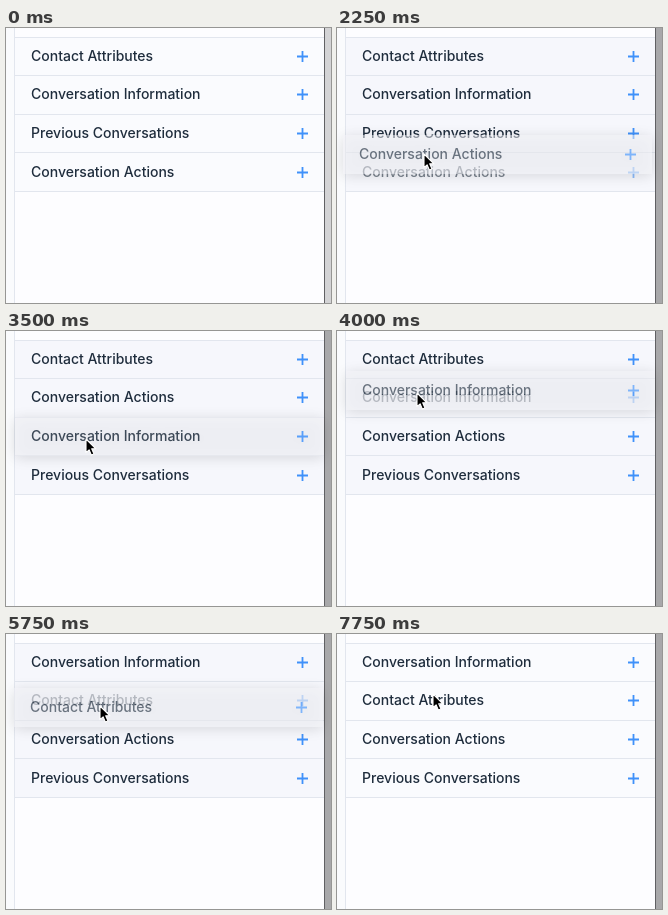
Recreate the animation shown at these times as an HTML page. Size 325 px wide and 275 px high, loop 8000 ms.

```html
<!DOCTYPE html>
<html lang="en">
<head>
<meta charset="utf-8">
<title>Reorder panel sections</title>
<style>
  html, body { margin: 0; width: 100%; height: 100%; overflow: hidden; background: #fdfdff; }
  body > *, .row svg { position: absolute; }
  .row {
    left: 9px; top: 0; width: 293px; height: 39px; padding-left: 16px;
    font: 500 14px/37px Inter, "Open Sans", sans-serif; color: #1f2d3d; white-space: nowrap;
  }
  .row svg { left: 282px; top: 14px; width: 11px; height: 11px; fill: none; stroke: #3f91fa; stroke-width: 1.8; }
  #side { left: 0; top: 0; width: 8px; height: 100%; background: #fafbfd; border-right: 1px solid #e2e6ee; }
  #list { left: 9px; top: 9px; width: 309px; height: 154px; }
  .line { left: 9px; width: 309px; height: 1px; background: #e2e6ee; }
  #edge { left: 318px; top: 0; width: 6px; height: 100%; border-left: 1px solid #606063; }
  #ghost {
    background: rgba(241, 241, 246, .8); opacity: .65;
    filter: drop-shadow(0 2px 7px rgba(0, 0, 0, .24));
  }
  #cursor {
    left: 0; top: 0; width: 12px; height: 18px; overflow: visible;
    stroke: #fff; stroke-width: 1.1; stroke-linejoin: round;
  }
</style>
</head>
<body>
<div id="side"></div>
<div id="list"></div>
<div id="edge"></div>
<div id="ghost" class="row"></div>
<svg id="cursor"><path d="M0 0V13.6L3.1 10.8L5.3 16L7.9 14.9L5.7 9.8H9.9Z"/></svg>
<script>
  const STEP = 250, COUNT = 32, TOP = 9, PITCH = 38.5;
  const $ = id => document.getElementById(id);
  const labels = ['Contact Attributes', 'Conversation Information',
    'Previous Conversations', 'Conversation Actions'];

  // Pointer waypoints: step, x, y
  const path = [
    [1, 300, 258], [5, 74, 142], [6, 74, 142], [8, 90, 144], [11, 79, 76],
    [14, 80, 108], [16, 80, 62], [20, 95, 27], [21, 89, 42],
    [23, 94, 72], [26, 102, 98], [27, 106, 92], [31, 96, 60]
  ];
  // Steps between which the button is held
  const holds = [[8, 11], [14, 16], [20, 23], [26, 27]];

  const lineTop = i => Math.floor(TOP + PITCH * i);
  const rowTop = i => TOP + Math.floor(38.75 * i);
  const slotAt = y => Math.floor((y - TOP) / PITCH);
  const ease = t => t * t * (3 - 2 * t);
  const move = (el, x, y) => el.style.transform = `translate(${x}px, ${y}px)`;
  const show = (el, on) => el.style.visibility = on ? 'visible' : 'hidden';

  function pointer(step) {
    const i = Math.max(1, path.findIndex(p => p[0] >= step));
    const [a, b] = [path[i - 1], path[i]];
    const k = ease((step - a[0]) / (b[0] - a[0]));
    return [1, 2].map(n => Math.round(a[n] + (b[n] - a[n]) * k));
  }

  // Replays the drags up to a step: a held row takes the slot under the pointer
  function stateAt(step) {
    const order = [0, 1, 2, 3];
    let drag = null;
    for (const [from, to] of holds) {
      if (from > step) break;
      const [x, y] = pointer(from);
      const slot = slotAt(y), row = order[slot];
      const target = slotAt(pointer(Math.min(step, to))[1]);
      order.splice(slot, 1);
      order.splice(target, 0, row);
      drag = step <= to ? { row, slot, x, y } : null;
    }
    return { order, drag };
  }

  function fill(el, label) {
    el.innerHTML = `${label}<svg><path d="M0 5.5H11M5.5 0V11"/></svg>`;
  }

  function add(className) {
    const el = document.createElement('div');
    el.className = className;
    $('edge').before(el);
    return el;
  }

  for (let i = 0; i <= labels.length; i++) add('line').style.top = lineTop(i) + 'px';
  const rows = labels.map(label => {
    const el = add('row');
    fill(el, label);
    return el;
  });

  function draw(step) {
    const { order, drag } = stateAt(step);
    const [x, y] = pointer(Math.max(1, step));

    order.forEach((row, i) => {
      move(rows[row], 0, rowTop(i));
      rows[row].style.opacity = drag && drag.row === row ? .58 : 1;
    });

    show($('cursor'), step > 0);
    move($('cursor'), x, y);

    show($('ghost'), drag);
    if (drag) {
      fill($('ghost'), labels[drag.row]);
      move($('ghost'), x - drag.x, rowTop(drag.slot) + y - drag.y);
    }

    const active = step >= holds[0][0] && step <= holds[holds.length - 1][1];
    $('list').style.background = active ? '#f6f7fc' : '#fafbfe';
    $('edge').style.background = step ? '#a8a8aa' : '#d3d3d5';
  }

  const start = performance.now();
  let last = -1;
  function tick() {
    const step = Math.floor((performance.now() - start) / STEP) % COUNT;
    if (step !== last) draw(last = step);
    requestAnimationFrame(tick);
  }
  tick();
</script>
</body>
</html>
```
